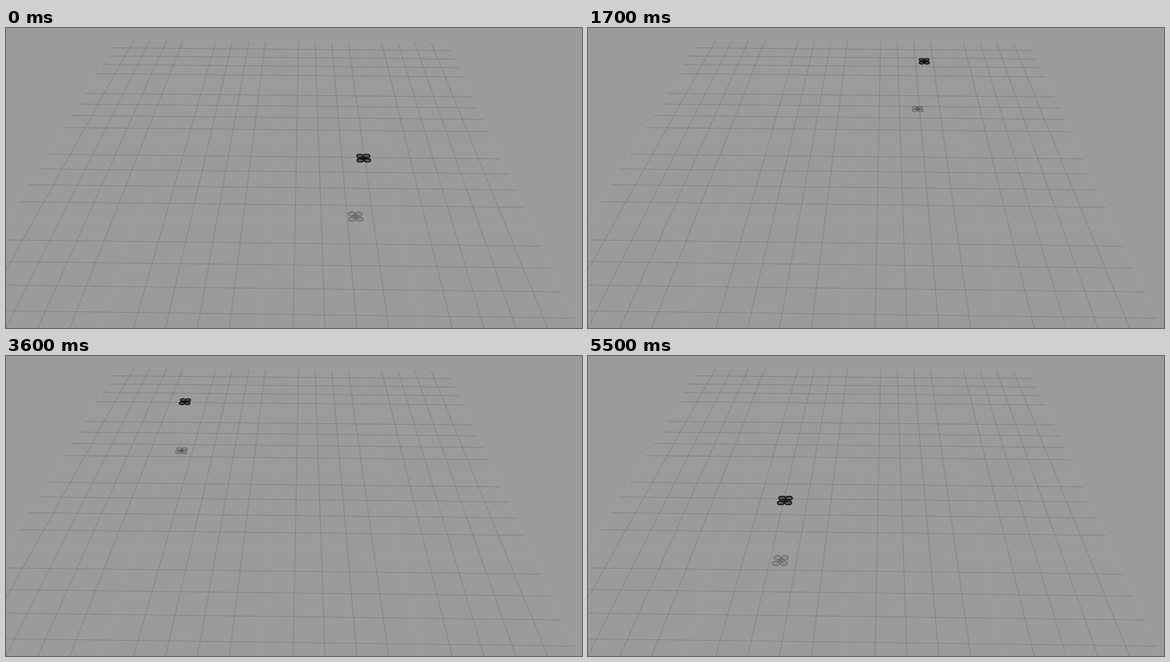
These frames come from a looping animation (831 by 433 pixels, 5600 ms). An HTML page with a canvas:

```html
<!DOCTYPE html>
<html>
<head>
<meta charset="utf-8">
<title>Quadrotor circling over a grid</title>
<style>
  html, body { margin: 0; width: 100%; height: 100%; overflow: hidden; background: #9b9b9b; }
  canvas { display: block; }
</style>
</head>
<body>
<canvas id="stage" width="831" height="433"></canvas>
<script>
const ctx = document.getElementById('stage').getContext('2d');
const LOOP = 5600, STEP = 100;
const ORBIT = { u: -0.235, v: 11.13, radius: 5 };

// Perspective view of the ground: u counts columns from the middle, v counts rows from the back
function project(u, v) {
  const depth = 1 - 0.000263 * u - 0.02466 * v;
  return [
    (397.85 + 23.75 * u - 10.61 * v) / depth,
    (19 + 0.195 * u + 10.54 * v) / depth
  ];
}

// The flight settles quickly into a gently slowing turn
function shadowAt(seconds) {
  const degrees = -40.4 + 54.8 * seconds - 0.63 * seconds ** 2 - 4 * Math.exp(-seconds / 0.3);
  const angle = degrees * Math.PI / 180;
  return project(
    ORBIT.u + ORBIT.radius * Math.cos(angle),
    ORBIT.v - ORBIT.radius * Math.sin(angle)
  );
}

// Position above the shadow at constant altitude
function droneAbove(x, y) {
  return [x * (1.0175 + 0.00002 * y), 0.9 * y - 57.2];
}

function line([x1, y1], [x2, y2]) {
  ctx.beginPath();
  ctx.moveTo(x1, y1);
  ctx.lineTo(x2, y2);
  ctx.stroke();
}

function drawGrid() {
  ctx.save();
  ctx.translate(0.4, 0.4);
  ctx.lineWidth = 1;
  for (let n = 0; n <= 20; n++) {
    ctx.strokeStyle = n % 5 ? 'rgba(0,0,0,0.15)' : 'rgba(255,255,255,0.035)';
    line(project(-10, n), project(10, n));
    line(project(n - 10, 0), project(n - 10, 20));
  }
  ctx.restore();
}

// Four rotors on crossed arms, skewed along the grid's perspective
function drawRotors(x, y, w, h, fill, stroke, weight) {
  const skew = (x - 440) * 0.0015;
  ctx.fillStyle = fill;
  ctx.strokeStyle = stroke;
  ctx.lineWidth = weight;
  for (const sy of [-1, 1]) for (const sx of [-1, 1]) {
    const dy = sy * h * 0.25, dx = sx * w * (0.24 + 0.01 * sy) + skew * dy;
    line([x, y], [x + dx * 0.7, y + dy * 0.7]);
    ctx.beginPath();
    ctx.ellipse(x + dx, y + dy, w * 0.225, h * 0.2, 0, 0, Math.PI * 2);
    ctx.fill();
    ctx.stroke();
  }
}

function drawShadow(x, y) {
  ctx.save();
  ctx.filter = 'blur(0.7px)';
  drawRotors(x, y, 12 + 0.037 * y, 3.7 + 0.042 * y, 'rgba(0,0,0,0.08)', 'rgba(0,0,0,0.27)', 1.4);
  ctx.restore();
}

function drawDrone(x, y) {
  const w = 13.6 + 0.038 * y, h = 7.5 + 0.028 * y;
  drawRotors(x, y, w, h, 'rgba(40,40,40,0.58)', '#0c0c0c', 1.4);
  ctx.fillStyle = '#171313';
  ctx.fillRect(x - w * 0.08, y - h * 0.1, w * 0.16, h * 0.25);
  ctx.strokeStyle = 'rgba(190,45,40,0.6)';
  ctx.lineWidth = 1;
  line([x - w * 0.04, y - h * 0.27], [x + w * 0.12, y - h * 0.27]);
}

function draw(now) {
  const time = Math.floor(now % LOOP / STEP) * STEP;
  const shadow = shadowAt(time / 1000);
  ctx.fillStyle = '#9b9b9b';
  ctx.fillRect(0, 0, 831, 433);
  drawGrid();
  drawShadow(...shadow);
  drawDrone(...droneAbove(...shadow));
}

const start = performance.now();
function tick() {
  draw(performance.now() - start);
  requestAnimationFrame(tick);
}
tick();
</script>
</body>
</html>
```
